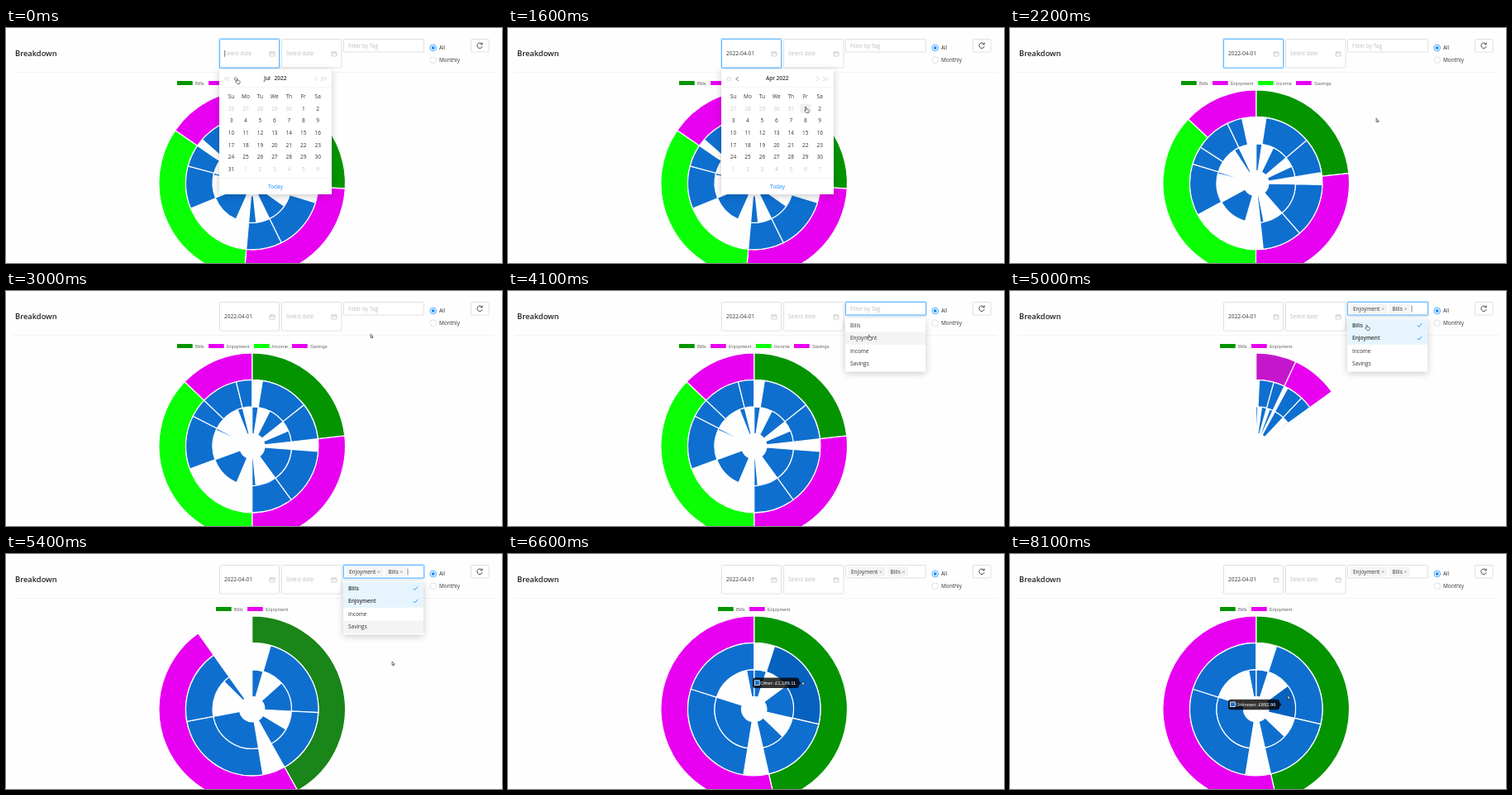
An HTML page that plays this animation: 600 by 284 pixels, repeating every 8200 ms.

```html
<!DOCTYPE html>
<html lang="en">
<head>
<meta charset="utf-8">
<title>Breakdown</title>
<style>
  html, body { margin: 0; width: 100%; height: 100%; overflow: hidden; background: #fdfefd; }
  svg { display: block; width: 600px; height: 284px; font: 6.5px 'Open Sans', 'Noto Sans', sans-serif; }
  .chart { font-family: 'Liberation Sans', Arial, sans-serif; font-size: 5.8px; }
  .pop { filter: drop-shadow(0 2px 4px rgba(0, 0, 0, .2)); }
</style>
</head>
<body>
<svg id="stage" viewBox="0 0 600 284"></svg>
<script>
const LOOP = 8200, STEP = 100;
const CX = 297.7, CY = 187.6, RADII = [112.8, 80.2, 47.7, 15.2];
const GREEN = [4, 148, 0], PINK = [232, 0, 240], LIME = [10, 255, 5];
const BLUE = '#0f6fcf', DARK_BLUE = '#0762bf', ACCENT = '#1890ff';
const TEXT = '#333', FAINT = '#bdbdbd';

// Each group: middle and inner arcs as fractions of the group's span
const bills = { name: 'Bills', color: GREEN, mid: [[.108, .616], [.616, 1]], inner: [[0, .108], [.32, .616], [.8, 1]] };
const fun = { name: 'Enjoyment', color: PINK, mid: [[.114, .625], [.625, 1]], inner: [[.114, .625], [.943, 1]] };
const income = { name: 'Income', color: LIME, mid: [[.524, .875], [.875, 1]], inner: [[.172, .524], [.853, .875]] };
const savings = { name: 'Savings', color: PINK, mid: [[0, .7], [.7, 1]], inner: [[.53, .7]] };
const allTime = [
  bills,
  { ...fun, mid: [[.15, .66], [.66, 1]], inner: [[.35, .66], [.88, 1]] },
  { ...income, mid: [[.524, .837], [.837, 1]], inner: [[.16, .53], [.81, .837]] },
  { ...savings, mid: [[.12, .7], [.7, 1]] }
];

// at: start of the transition; from: outer arc ends before it
const charts = [
  { at: -2000, groups: allTime, ends: [93.3, 185, 304.5, 360], from: [0, 0, 0, 0], legend: [207, 245, 300, 346] },
  { at: 1630, groups: [bills, fun, income, savings], ends: [83.6, 180, 313.7, 360], from: [93.3, 185, 304.5, 360], legend: [207, 245, 300, 346] },
  { at: 4410, groups: [fun], ends: [360], from: [83.6], tint: GREEN, legend: [273] },
  { at: 4960, groups: [bills, fun], ends: [167.2, 360], from: [0, 0], tint: PINK, legend: [254, 292] }
];

const cursorPath = [
  [0, 279, 61], [900, 279, 61], [1400, 360, 96], [1600, 360, 96], [2200, 443, 109],
  [2700, 443, 109], [3200, 440, 21], [3500, 440, 21], [4000, 436, 53], [4400, 436, 53],
  [4700, 431, 41], [5000, 431, 41], [5400, 467, 130], [5800, 467, 130], [6400, 356, 154],
  [6900, 356, 154], [8100, 336, 171]
];

const clamp = v => Math.max(0, Math.min(1, v));
const lerp = (a, b, p) => a + (b - a) * p;
const outQuart = v => 1 - (1 - clamp(v)) ** 4;
const rgb = c => `rgb(${c.map(Math.round)})`;
const blend = (a, b, p) => rgb(a.map((v, i) => lerp(v, b[i], p)));

const rect = (x, y, w, h, fill, extra = '') =>
  `<rect x="${x}" y="${y}" width="${w}" height="${h}" fill="${fill}" ${extra}/>`;
const path = (d, color, width = .7, fill = 'none') =>
  `<path d="${d}" stroke="${color}" stroke-width="${width}" fill="${fill}"/>`;
// y is the vertical middle of the line
const label = (x, y, s, color = TEXT, extra = '') =>
  `<text x="${x}" y="${y + 2.3}" fill="${color}" ${extra}>${s}</text>`;
const MIDDLE = 'text-anchor="middle"';

function sector(a, b, ring, fill) {
  if (b - a < .05) return '';
  b = Math.min(b, a + 359.99);
  const at = (deg, r) => {
    const rad = deg * Math.PI / 180;
    return `${CX + r * Math.sin(rad)} ${CY - r * Math.cos(rad)}`;
  };
  const R = RADII[ring], r = RADII[ring + 1], big = b - a > 180 ? 1 : 0;
  return path(`M${at(a, R)}A${R} ${R} 0 ${big} 1 ${at(b, R)}L${at(b, r)}A${r} ${r} 0 ${big} 0 ${at(a, r)}Z`,
    '#fff', 1.2, fill);
}

function chart(t) {
  const c = charts.filter(s => s.at <= t).pop();
  const p = outQuart((t - c.at) / 1000);
  const hover = t >= 7500 ? [2, 1] : t >= 6300 ? [1, 0] : [];
  let out = '', legend = '';
  c.groups.forEach((g, i) => {
    const start = i ? c.ends[i - 1] : 0, span = c.ends[i] - start;
    const fill = i == 0 && c.tint ? blend(c.tint, g.color, p) : rgb(g.color);
    out += sector(i ? lerp(c.from[i - 1], start, p) : 0, lerp(c.from[i], c.ends[i], p), 0, fill);
    [g.mid, g.inner].forEach((arcs, k) => arcs.forEach(([a, b], j) => {
      const lit = i == 0 && hover[0] == k + 1 && hover[1] == j;
      out += sector((start + a * span) * p, (start + b * span) * p, k + 1, lit ? DARK_BLUE : BLUE);
    }));
    const x = c.legend[i];
    legend += rect(x, 64, 18.7, 5, rgb(g.color)) + label(x + 22, 66.3, g.name, '#666');
  });
  return `<g class="chart">${out}${legend}</g>`;
}

function tooltip(t) {
  if (t < 6300) return '';
  const second = t >= 7500, p = second ? outQuart((t - 7500) / 400) : 0;
  const w = lerp(56, 62, p), x = lerp(296, 264, p), y = lerp(149.6, 175.8, p);
  const fade = outQuart((t - 6200) / 400);
  return `<g class="chart" opacity="${fade}"><g fill="#000" fill-opacity=".8">
    <path d="M${x + 3} ${y}h${w - 6}q3 0 3 3v.5l2.5 2.7l-2.5 2.7v.5q0 3 -3 3h${6 - w}q-3 0 -3 -3v-6.4q0 -3 3 -3z"/></g>` +
    rect(x + 2.6, y + 3.2, 5.6, 5.6, BLUE, 'stroke="#fff" stroke-width=".8"') +
    label(x + 9.2, y + 6, second ? 'Unknown: £692.96' : 'Other: £1,189.11', '#fff') + '</g>';
}

function box(x, y, w, h, focus) {
  const glow = focus ? rect(x - .8, y - .8, w + 1.6, h + 1.6, 'none', 'stroke="#1890ff" stroke-opacity=".22" stroke-width="1.5" rx="1"') : '';
  return glow + rect(x, y, w, h, '#fff', `stroke="${focus ? '#40a9ff' : '#d9d9d9'}" stroke-width=".8" rx="1"`);
}

const calendarIcon = x => path(`M${x} 29h6v5h-6zM${x} 30.8h6M${x + 1.6} 27.8v1.8M${x + 4.4} 27.8v1.8`, '#b5b5b5', .6);
const caret = (x, y) => path(`M${x} ${y - 4}v8`, '#333', .6);

function dateInputs(t) {
  const chosen = t >= 1600, preview = t >= 1300;
  return box(258.5, 13.5, 72, 34.5, t < 3000) + box(333.5, 13.5, 72.5, 34.5) +
    label(264, 31, preview ? '2022-04-01' : 'Select date', chosen ? TEXT : FAINT) +
    label(339, 31, 'Select date', FAINT) + calendarIcon(319) + calendarIcon(394) +
    (t < 1300 ? caret(264.4, 31) : '');
}

function picker(t) {
  if (t >= 1700) return '';
  const month = 6 - [300, 600, 900].filter(s => t >= s).length;
  const first = new Date(2022, month, 1).getDay();
  const name = ['Apr', 'May', 'Jun', 'Jul'][month - 3];
  let out = rect(258, 50, 136, 151, '#fff', 'class="pop"') +
    path('M258 71.5h136M258 181.5h136', '#f0f0f0') +
    path('M267 59l-2.5 2.5 2.5 2.5M270.5 59l-2.5 2.5 2.5 2.5M373.5 59l2.5 2.5-2.5 2.5M381 59l2.5 2.5-2.5 2.5M384.5 59l2.5 2.5-2.5 2.5', '#b5b5b5', .6) +
    path('M278.5 59l-2.5 2.5 2.5 2.5', '#333', .8) +
    label(312, 61, name, TEXT, 'font-weight="600"') + label(324.5, 61, '2022', TEXT, 'font-weight="600"') +
    label(326, 191.3, 'Today', ACCENT, MIDDLE);
  if (t >= 1300) out += rect(353.5, 92, 13, 11, '#f0f0f0', 'rx="1"');
  for (let i = 0; i < 7; i++)
    out += label(272.5 + i * 17.45, 82.3, ['Su', 'Mo', 'Tu', 'We', 'Th', 'Fr', 'Sa'][i], TEXT, MIDDLE);
  for (let i = 0; i < 42; i++) {
    const day = new Date(2022, month, 1 - first + i);
    out += label(272.5 + i % 7 * 17.45, 97.6 + Math.floor(i / 7) * 14.55, day.getDate(),
      day.getMonth() == month ? TEXT : '#c6c6c6', MIDDLE);
  }
  return out;
}

function tag(x, w, name) {
  const cross = x + w - 5;
  return rect(x, 16.3, w, 10.4, '#f5f5f5', 'stroke="#eee" stroke-width=".6" rx="1"') +
    label(x + 3, 21.5, name) + path(`M${cross - 1.4} 20.2l2.8 2.8m0 -2.8l-2.8 2.8`, '#888', .6);
}

function tagFilter(t) {
  const open = t >= 3400 && t < 5800, picked = [];
  let out = box(408.5, 13.5, 97, 15.5, open);
  if (t >= 4400) { out += tag(412, 44, 'Enjoyment'); picked.push('Enjoyment'); }
  else out += label(414, 21.5, 'Filter by Tag', FAINT);
  if (t >= 4950) { out += tag(459.5, 24, 'Bills'); picked.push('Bills'); }
  if (!open) return out;
  if (picked.length) out += caret(picked.length > 1 ? 486 : 458.5, 21.5);
  out += rect(408, 33, 97, 64.5, '#fff', 'class="pop"');
  const active = t < 3700 ? 0 : t < 4500 ? 1 : t < 5100 ? 0 : t < 5200 ? 2 : 3;
  ['Bills', 'Enjoyment', 'Income', 'Savings'].forEach((name, i) => {
    const y = 41.5 + i * 15.55, on = picked.includes(name);
    if (on || i == active) out += rect(408, y - 7.7, 97, 15.5, on ? '#e6f5fd' : '#f4f4f4');
    out += label(414, y, name, TEXT, on ? 'font-weight="600"' : '');
    if (on) out += path(`M492.8 ${y}l1.8 2 3.6 -4.2`, ACCENT, .9);
  });
  return out;
}

function header() {
  const ring = (y, color) => `<circle cx="516.7" cy="${y}" r="3.8" fill="#fff" stroke="${color}" stroke-width=".8"/>`;
  return path('M8 53.5H592', '#f1f1f1', .8) +
    `<text x="11" y="33.6" font-size="9.3" font-weight="600" fill="#222">Breakdown</text>` +
    ring(24, ACCENT) + `<circle cx="516.7" cy="24" r="2" fill="${ACCENT}"/>` + label(524, 24, 'All') +
    ring(38.7, '#d9d9d9') + label(524, 38.7, 'Monthly') +
    box(562.5, 13.5, 21.5, 15.5) +
    path('M575.6 19.2A3.2 3.2 0 1 0 576.2 22.2M576.2 17.6v2.2h-2.2', '#333', .9);
}

function cursor(t) {
  let i = cursorPath.findIndex(k => k[0] > t);
  if (i < 0) i = cursorPath.length - 1;
  const [t0, x0, y0] = cursorPath[i - 1], [t1, x1, y1] = cursorPath[i];
  let p = clamp((t - t0) / (t1 - t0));
  p = p * p * (3 - 2 * p);
  const hand = t < 1700 || (t >= 3700 && t < 5100);
  const shape = hand
    ? 'M0 .4q.7 -.8 1.2 0v2l2.6 .7q.6 .3 .4 1.2l-.6 2.2h-2.8l-2 -2.4q-.1 -.9 1.2 -.2z'
    : 'M0 0v4.4l1 -.9 .8 1.6 .7 -.4 -.7 -1.5h1.3z';
  return `<g transform="translate(${lerp(x0, x1, p)} ${lerp(y0, y1, p)})">${path(shape, '#222', .6, '#fff')}</g>`;
}

const stage = document.getElementById('stage');
const began = performance.now();
let shown = -1;

function frame() {
  const t = Math.floor((performance.now() - began) % LOOP / STEP) * STEP;
  if (t != shown) {
    shown = t;
    stage.innerHTML = header() + chart(t) + dateInputs(t) + picker(t) + tagFilter(t) + tooltip(t) + cursor(t);
  }
  requestAnimationFrame(frame);
}
frame();
</script>
</body>
</html>
```
